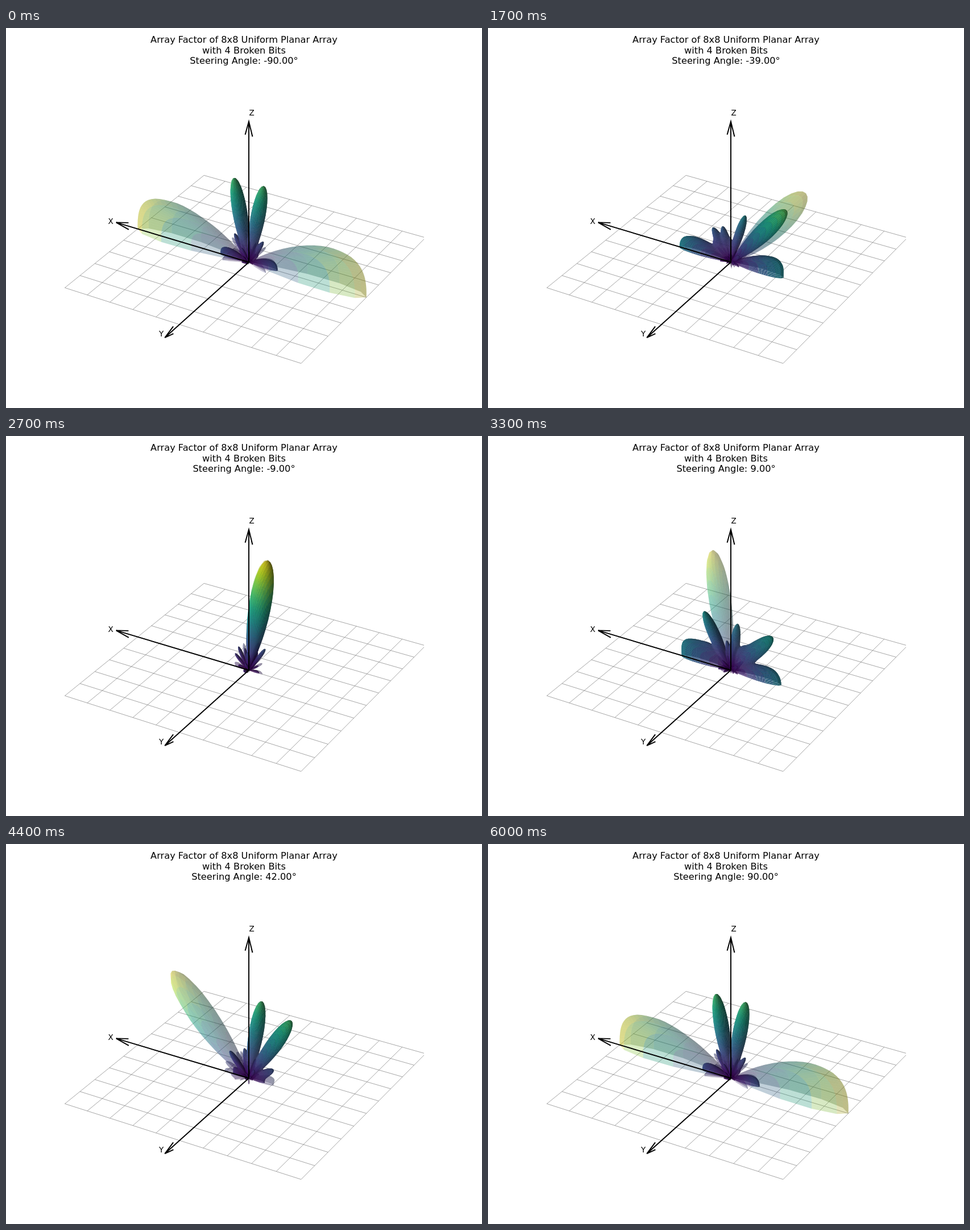
Animation, 837 px wide and 669 px high, one loop 6100 ms. Source, as an HTML page with a canvas:

```html
<!DOCTYPE html>
<html lang="en">
<head>
<meta charset="utf-8">
<title>Array factor</title>
<style>
  html, body { margin: 0; width: 100%; height: 100%; overflow: hidden; background: #fff; }
  canvas, svg { position: absolute; left: 0; top: 0; width: 837px; height: 669px; display: block; }
  text { font-family: "DejaVu Sans", sans-serif; text-anchor: middle; }
  .title { font-size: 16.2px; }
  .label { font-size: 13.5px; }
  path { fill: none; stroke: #000; stroke-width: 1.95; }
</style>
</head>
<body>
<canvas id="plot" width="837" height="669"></canvas>
<svg viewBox="0 0 837 669">
  <g class="title">
    <text x="418.5" y="26">Array Factor of 8x8 Uniform Planar Array</text>
    <text x="418.5" y="44.5">with 4 Broken Bits</text>
    <text x="418.5" y="63" id="angle"></text>
  </g>
  <path id="axes"/>
  <g class="label">
    <text x="184" y="345">X</text>
    <text x="273" y="543">Y</text>
    <text x="432" y="154">Z</text>
  </g>
</svg>
<script>
const N = 8, BITS = 4, LEVELS = 1 << BITS, MSB = LEVELS / 2;
const STEP_MS = 100, STEPS = 61;
const STUCK = { 1: 0, 3: 0, 4: 0, 6: 1 };   // column: value of its top phase bit
const VIRIDIS = ['440154', '482475', '414487', '355f8d', '2a788e', '21918c',
  '22a884', '44bf70', '7ad151', 'bddf26', 'fde725']
  .map(h => [0, 2, 4].map(i => parseInt(h.slice(i, i + 2), 16)));
const LIGHT = [2 / 3, 2 / 3, -1 / 3];
const ctx = document.getElementById('plot').getContext('2d');
const angleText = document.getElementById('angle');

// Perspective camera: azimuth 120, elevation 30
const CX = 427, CY = 412.3, SCALE = 232, PERSP = 0.0646, SHIFT = 80;
function project(x, y, z) {
  const near = -0.433 * x + 0.75 * y + 0.5 * z;
  const k = 1 / (1 - near * PERSP);
  const right = -0.866 * x - 0.5 * y;
  const up = 0.25 * x - 0.433 * y + 0.866 * z;
  return [CX + SCALE * right * k, CY - SHIFT + (SHIFT - SCALE * up) * k, near];
}

function viridis(t, shade) {
  const p = Math.min(Math.max(t, 0), 1) * 10, i = Math.min(9, Math.floor(p)), f = p - i;
  const c = VIRIDIS[i].map((a, n) => Math.round((a + (VIRIDIS[i + 1][n] - a) * f) * shade));
  return `rgb(${c})`;
}

// Magnitude of a row of elements with given phases, seen at direction cosine s
function rowGain(phases, s) {
  let re = 0, im = 0;
  for (let m = 0; m < N; m++) {
    const a = Math.PI * m * s + phases[m];
    re += Math.cos(a);
    im += Math.sin(a);
  }
  return Math.hypot(re, im) / N;
}

const FLAT = new Array(N).fill(0);

function idealPhases(deg) {
  const s = Math.sin(deg * Math.PI / 180);
  return FLAT.map((_, m) => -Math.PI * m * s);
}

function brokenPhases(deg) {
  const unit = 2 * Math.PI / LEVELS;
  return idealPhases(deg).map((p, m) => {
    let q = ((Math.round(p / unit) % LEVELS) + LEVELS) % LEVELS;
    if (m in STUCK) q = (q % MSB) + STUCK[m] * MSB;
    return q * unit;
  });
}

// Unit directions and the fixed y gain are shared by all steps
function makeMesh(rows, cols) {
  const dirs = [];
  for (let i = 0; i <= rows; i++) {
    const th = i / rows * Math.PI / 2;
    for (let j = 0; j <= cols; j++) {
      const ph = j / cols * 2 * Math.PI;
      const u = Math.sin(th) * Math.cos(ph), v = Math.sin(th) * Math.sin(ph);
      dirs.push({ u, v, w: Math.cos(th), gy: rowGain(FLAT, v) });
    }
  }
  return { rows, cols, dirs };
}

const coarse = makeMesh(60, 120);
const fine = makeMesh(90, 180);

function shadeOf(a, b, c, d) {
  const p = [0, 1, 2].map(i => c.pos[i] - a.pos[i]);
  const q = [0, 1, 2].map(i => b.pos[i] - d.pos[i]);
  const n = [p[1] * q[2] - p[2] * q[1], p[2] * q[0] - p[0] * q[2], p[0] * q[1] - p[1] * q[0]];
  const len = Math.hypot(...n) || 1;
  const dot = (n[0] * LIGHT[0] + n[1] * LIGHT[1] + n[2] * LIGHT[2]) / len;
  return 0.3 + 0.7 * (dot + 1) / 2;
}

function drawSurface(mesh, phases, alpha) {
  const { rows, cols, dirs } = mesh;
  const pts = dirs.map(({ u, v, w, gy }) => {
    const r = rowGain(phases, u) * gy;
    const pos = [u * r, v * r, w * r];
    return { r, pos, scr: project(...pos) };
  });
  const quads = [];
  for (let i = 0; i < rows; i++) {
    for (let j = 0; j < cols; j++) {
      const k = i * (cols + 1) + j;
      // a, b run along phi; d, c are one theta step further
      const q = [pts[k], pts[k + 1], pts[k + cols + 2], pts[k + cols + 1]];
      if (Math.max(q[0].r, q[1].r, q[2].r, q[3].r) < 0.006) continue;
      quads.push({ q, near: q[0].scr[2] + q[1].scr[2] + q[2].scr[2] + q[3].scr[2] });
    }
  }
  quads.sort((a, b) => a.near - b.near);
  ctx.globalAlpha = alpha;
  for (const { q } of quads) {
    const r = (q[0].r + q[1].r + q[2].r + q[3].r) / 4;
    ctx.fillStyle = viridis(r, shadeOf(...q));
    ctx.beginPath();
    for (const p of q) ctx.lineTo(p.scr[0], p.scr[1]);
    ctx.fill();
  }
  ctx.globalAlpha = 1;
}

function drawGrid() {
  ctx.save();
  ctx.beginPath();
  ctx.rect(0, 0, 735, 669);
  ctx.clip();
  ctx.beginPath();
  for (let i = 0; i <= 10; i++) {
    const t = i / 5 - 1;
    for (const [a, b] of [[[t, -1], [t, 1]], [[-1, t], [1, t]]]) {
      ctx.moveTo(...project(...a, 0).slice(0, 2));
      ctx.lineTo(...project(...b, 0).slice(0, 2));
    }
  }
  ctx.strokeStyle = '#808080';
  ctx.lineWidth = 0.7;
  ctx.stroke();
  ctx.restore();
}

function axisPath(place) {
  const at = (along, side) => project(...place(along, side)).slice(0, 2).map(n => n.toFixed(2));
  const tip = at(1.2, 0);
  return `M${at(0, 0)}L${tip}M${at(1.084, 0.031)}L${tip}L${at(1.084, -0.031)}`;
}

document.getElementById('axes').setAttribute('d', [
  (a, s) => [a, 0, s],
  (a, s) => [0, a, s],
  (a, s) => [s, 0, a]
].map(axisPath).join(''));

function render(step) {
  const deg = -90 + 3 * step;
  angleText.textContent = `Steering Angle: ${deg.toFixed(2)}°`;
  ctx.clearRect(0, 0, 837, 669);
  drawGrid();
  drawSurface(coarse, idealPhases(deg), 0.3);
  drawSurface(fine, brokenPhases(deg), 1);
}

let shown = -1;
const start = performance.now();
function tick() {
  const step = Math.floor((performance.now() - start) / STEP_MS) % STEPS;
  if (step !== shown) render(shown = step);
  requestAnimationFrame(tick);
}
tick();
</script>
</body>
</html>
```
